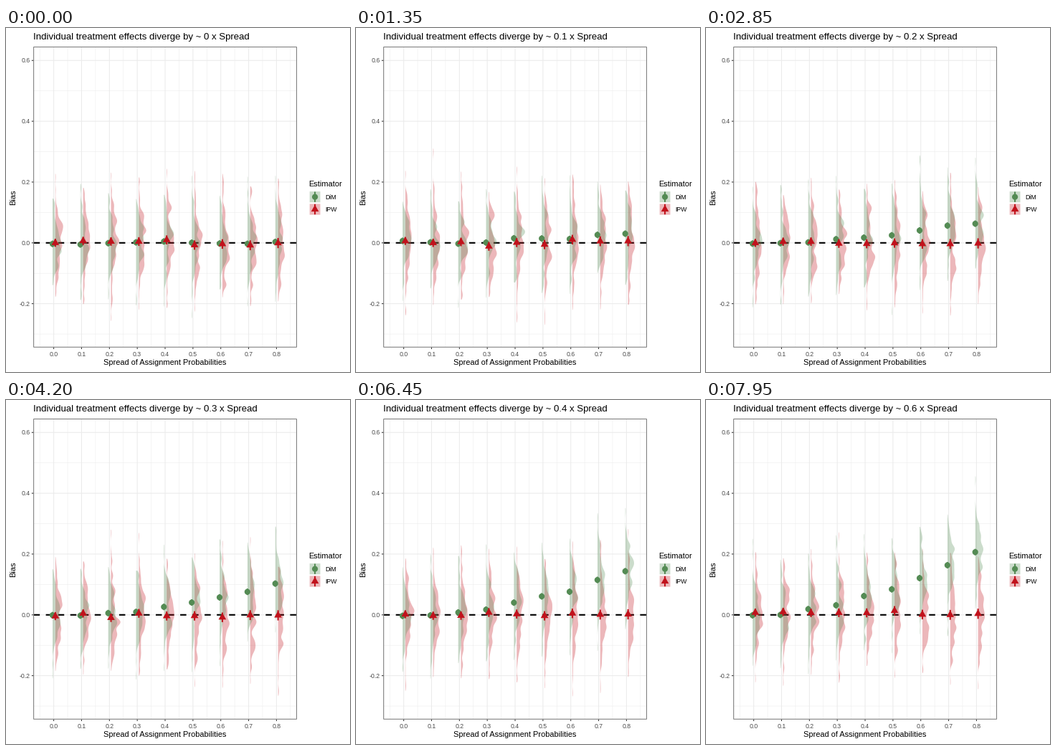
Write a matplotlib script that moves like this. It is 480x480 px and loops after 8000 ms.

```python
import numpy as np
import matplotlib.pyplot as plt
from matplotlib.animation import FuncAnimation
from matplotlib.collections import LineCollection, PolyCollection
from matplotlib.patches import Polygon, Rectangle

plt.rcParams["font.family"] = "Liberation Sans"
plt.rcParams["path.snap"] = False
PT = 0.72                      # points per pixel at 100 dpi
TICK_MS, LOOP_MS, STEP_MS = 50, 8000, 150
GREEN, RED = "#548B54", "#C1121C"
LEFT, RIGHT, TOP, BOTTOM = 38.6, 405.5, 26.5, 445.3
SPREADS = np.arange(9) / 10
DIVERGENCES = np.arange(7) / 10

# Start and step count of each transition
MOVES = [(750, 5), (2250, 5), (3750, 4), (5100, 4), (6450, 4), (7650, 3)]


def px(x):
    return 66.6 + 388.5 * np.asarray(x)


def py(y):
    return 299.8 - 424.2 * np.asarray(y)


def polygon(n, radius):
    """Regular polygon with one corner pointing up."""
    a = np.arange(n) * 2 * np.pi / n - np.pi / 2
    return radius * np.column_stack([np.cos(a), np.sin(a)])


def half_density(rng, base, mean, sd, width=0.0115, points=240):
    """Outline of a narrow-kernel density drawn to the right of base."""
    draws = rng.normal(0, sd, 100)
    draws += mean - draws.mean()
    grid = np.linspace(draws.min() - 0.01, draws.max() + 0.01, points)
    bumps = np.exp(-0.5 * ((grid[:, None] - draws) / width) ** 2)
    density = bumps.mean(axis=1) / (width * np.sqrt(2 * np.pi))
    edge = np.column_stack([base + 1.8 * density, py(grid)])
    back = np.column_stack([np.full(points, base), py(grid[::-1])])
    return np.vstack([edge, back])


def line(xs, ys, color, width, z=0.5, **style):
    ax.plot(xs, ys, color=color, lw=width * PT, zorder=z,
            solid_capstyle="butt", **style)


def text(x, y, s, size, color="black", **style):
    return ax.text(x, y, s, fontsize=size * PT, color=color, **style)


class Estimator:
    def __init__(self, slope, noise, sd, dodge, color, shape, reach, seed,
                 slab_z, point_z):
        rng = np.random.default_rng(seed)
        self.x = px(SPREADS) + dodge
        self.color, self.shape, self.reach = color, shape, reach
        # Bias grows with the divergence and the square of the spread
        self.means = (slope * np.outer(DIVERGENCES, SPREADS ** 2)
                      + rng.normal(0, noise, (7, 9)))
        self.slabs = np.array([
            [half_density(rng, x, m, s) for x, m, s in zip(self.x, row, sd)]
            for row in self.means])
        self.slab = PolyCollection([], facecolors=color, alpha=0.3,
                                   linewidths=0, zorder=slab_z)
        self.bars = LineCollection([], colors=color, linewidths=2.1 * PT,
                                   zorder=point_z)
        self.dots = PolyCollection([], facecolors=color, linewidths=0,
                                   zorder=point_z)
        for artist in (self.slab, self.bars, self.dots):
            ax.add_collection(artist)

    def show(self, a, b, t):
        self.slab.set_verts(self.slabs[a] * (1 - t) + self.slabs[b] * t)
        y = py(self.means[a] * (1 - t) + self.means[b] * t)
        self.bars.set_segments([[(u, v - r), (u, v + r)]
                                for u, v, r in zip(self.x, y, self.reach)])
        self.dots.set_verts([self.shape + (u, v) for u, v in zip(self.x, y)])

    def legend(self, label, y):
        ax.add_patch(Rectangle((423.7, y - 7.6), 14.8, 15.2, fc=self.color,
                               alpha=0.3, lw=0))
        line([431.1, 431.1], [y - 7.2, y + 7.2], self.color, 2.1, z=9)
        ax.add_patch(Polygon(self.shape + (431.1, y), fc=self.color, lw=0,
                             zorder=9))
        text(445, y + 3.2, label, 8.8)


fig = plt.figure(figsize=(4.8, 4.8), dpi=100, facecolor="white")
ax = fig.add_axes([0, 0, 1, 1])
ax.set(xlim=(0, 480), ylim=(480, 0))
ax.axis("off")

for x in np.arange(-0.05, 0.9, 0.1):
    line([px(x)] * 2, [TOP, BOTTOM], "#EBEBEB", 0.53)
for y in np.arange(-0.3, 0.6, 0.2):
    line([LEFT, RIGHT], [py(y)] * 2, "#EBEBEB", 0.53)
for x in SPREADS:
    line([px(x)] * 2, [TOP, BOTTOM], "#EBEBEB", 1.07)
    line([px(x)] * 2, [BOTTOM, BOTTOM + 2.75], "#333333", 1.07)
    text(px(x), 458.2, f"{x:.1f}", 8.8, "#4D4D4D", ha="center")
for y in (-0.2, 0.0, 0.2, 0.4, 0.6):
    line([LEFT, RIGHT], [py(y)] * 2, "#EBEBEB", 1.07)
    line([LEFT - 2.75, LEFT], [py(y)] * 2, "#333333", 1.07)
    text(33.7, py(y) + 3.2, f"{y:.1f}", 8.8, "#4D4D4D", ha="right")
line([LEFT, RIGHT], [py(0)] * 2, "black", 2.13, z=1,
     dashes=(4, 4), dash_capstyle="butt")
ax.add_patch(Rectangle((LEFT, TOP), RIGHT - LEFT, BOTTOM - TOP, fill=False,
                       ec="#7F7F7F", lw=1.07 * PT, zorder=8))

title = text(38.3, 16, "", 13.2)
text((LEFT + RIGHT) / 2, 469.8, "Spread of Assignment Probabilities", 11,
     ha="center")
text(9.8, 236, "Bias", 11, rotation=90, ha="center", va="center")
text(422.3, 221, "Estimator", 11)

# Green slabs lie over red ones, red points over green ones
dim = Estimator(slope=0.544, noise=0.004, sd=np.full(9, 0.07), dodge=-1.7,
                color=GREEN, shape=polygon(32, 4.1), reach=np.full(9, 4.5),
                seed=5, slab_z=3, point_z=5)
ipw = Estimator(slope=0, noise=0.006, sd=0.08 + 0.01 * SPREADS, dodge=2.2,
                color=RED, shape=polygon(3, 6.2), reach=5.5 + 2 * SPREADS,
                seed=12, slab_z=2, point_z=6)
dim.legend("DiM", 235.7)
ipw.legend("IPW", 253)


def pose(ms):
    """State left, state entered and progress between them."""
    a, b, t = 0, 0, 1.0
    for i, (start, steps) in enumerate(MOVES):
        if ms >= start:
            step = (ms - start) // STEP_MS + 1
            a, b, t = i, i + 1, min(step / steps, 1.0)
    return a, b, t


def update(frame):
    a, b, t = pose(frame * TICK_MS)
    nearest = b if t >= 0.5 else a
    title.set_text("Individual treatment effects diverge by ~ "
                   f"{DIVERGENCES[nearest]:g} x Spread")
    for estimator in (dim, ipw):
        estimator.show(a, b, t)
    return []


anim = FuncAnimation(fig, update, frames=LOOP_MS // TICK_MS,
                     interval=TICK_MS, repeat=True, repeat_delay=0)
plt.show()
```
